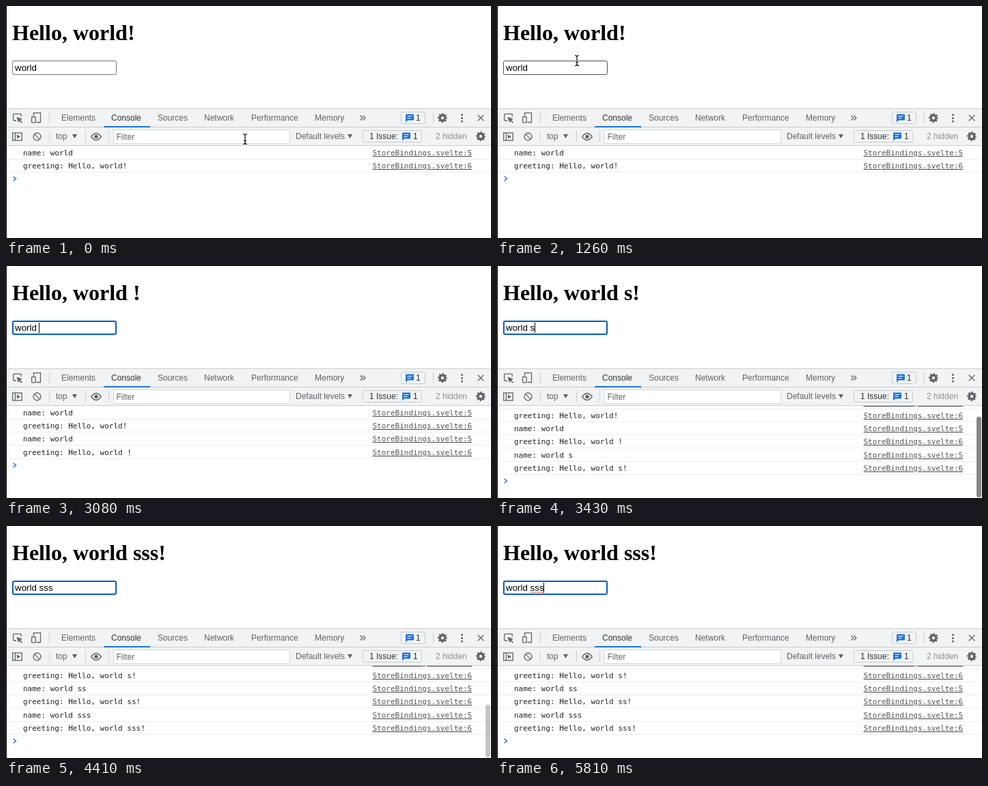
An HTML page for the animation above (5880 ms loop, 710x340 px).

```html
<!DOCTYPE html>
<html lang="en">
<head>
<meta charset="utf-8">
<title>Store bindings</title>
<style>
  html, body { margin: 0; width: 100%; height: 100%; overflow: hidden; background: #fff; }
  svg { display: block; }
  text { white-space: pre; font: 12px "Liberation Sans", Arial, sans-serif; fill: #5f6368; }
  .title { font: bold 32px "Liberation Serif", Times, serif; fill: #000; }
  .value { font-size: 13.333px; fill: #000; }
  .dark { fill: #333; }
  .log { font: 11px "DejaVu Sans Mono", monospace; fill: #242424; }
  .link { fill: #545454; text-decoration: underline; }
  .line { fill: none; stroke: #5f6368; stroke-width: 1.3; }
  .fill { fill: #5f6368; }
  .rule { fill: #cacdd1; }
  .box { fill: none; stroke: #cacdd1; }
</style>
</head>
<body>
<svg width="710" height="340" viewBox="0 0 710 340">
  <defs>
    <clipPath id="view"><rect x="1" y="205" width="709" height="135"/></clipPath>
    <g id="gear">
      <circle r="3.9" fill="none" stroke="#5f6368" stroke-width="3.2"/>
      <circle r="5.9" fill="none" stroke="#5f6368" stroke-width="2.2" stroke-dasharray="2.5 2.134" stroke-dashoffset="1.25"/>
    </g>
    <g id="chat">
      <path d="M1 0H11Q12 0 12 1V8Q12 9 11 9H3L0 12V1Q0 0 1 0Z" fill="#1a73e8"/>
      <path d="M2.5 3H9.5M2.5 6H7.5" stroke="#fff" stroke-width="1.2"/>
    </g>
    <path id="down" d="M0 0H7L3.5 6Z" class="fill"/>
  </defs>
  <rect width="710" height="340" fill="#fff"/>

  <g id="page">
    <text id="title" class="title" x="9" y="50"></text>
    <rect id="field" fill="#fff"/>
    <text id="value" class="value" x="13" y="95"></text>
    <path id="typo" d="M49.5 97.2H69" stroke="#e5433b" stroke-width="1.6" stroke-dasharray="1.8 1.4"/>
    <rect id="caret" y="83" width="1" height="15"/>
  </g>

  <g id="console" clip-path="url(#view)">
    <path id="prompt" d="M10.7-3.2L14.5 0L10.7 3.2" fill="none" stroke="#367cf1" stroke-width="1.6"/>
    <rect id="thumb" x="702" width="7" rx="3.5" fill="#858585"/>
  </g>

  <rect y="150" width="710" height="55" fill="#f1f3f4"/>
  <path class="rule" d="M0 150H710V151H0ZM0 177H710V178H0ZM0 204H710V205H0Z"/>
  <path class="rule" d="M63 156h1v16h-1zM625 156h1v16h-1zM63 183h1v16h-1zM116 183h1v16h-1zM150 183h1v16h-1z"/>

  <path class="line" d="M15 168H12Q10.7 168 10.7 166.700V159.500Q10.700 158.200 12 158.200H21Q22.300 158.200 22.300 159.500V162"/>
  <path class="fill" d="M15.500 162.500L24 165.500L20.800 167L24 170.200L22.800 171.400L19.600 168.200L18.200 171.200Z"/>
  <path class="line" d="M40.500 161V156.700H50.500V170.500H44.500"/>
  <rect class="line" x="37.600" y="162.500" width="5.500" height="8.300" rx=".8"/>
  <g id="tabs"></g>
  <rect x="143" y="176" width="68" height="2" fill="#1a73e8"/>
  <path class="line" d="M518.500 160.500l3.500 3.500l-3.500 3.500M522.500 160.500l3.500 3.500l-3.500 3.500"/>
  <rect class="box" x="578.500" y="155.500" width="35" height="17" rx="2"/>
  <use href="#chat" x="585" y="158.500"/>
  <text class="dark" x="600" y="168">1</text>
  <use href="#gear" x="639" y="164"/>
  <g class="fill"><circle cx="667.500" cy="159.500" r="1.500"/><circle cx="667.500" cy="164.200" r="1.500"/><circle cx="667.500" cy="169" r="1.500"/></g>
  <path class="line" d="M690.700 159.700l8.600 8.600m0-8.600l-8.600 8.600"/>

  <rect class="line" x="9.700" y="186" width="13.600" height="11"/>
  <path class="line" d="M13.500 186v11"/>
  <path class="fill" d="M16 188.500l5 3l-5 3z"/>
  <circle class="line" cx="45.500" cy="191.500" r="5.500"/>
  <path class="line" d="M41.600 187.600l7.800 7.800"/>
  <text x="73" y="195">top</text>
  <use href="#down" x="97" y="188"/>
  <path class="line" d="M124.700 191.500Q132 181.500 139.300 191.500Q132 201.500 124.700 191.500Z"/>
  <circle class="fill" cx="132" cy="191.500" r="2.700"/>
  <rect x="157.500" y="181.500" width="258" height="20" fill="#fff" stroke="#d5dae0"/>
  <text x="161.500" y="196">Filter</text>
  <text x="424" y="195">Default levels</text>
  <use href="#down" x="500" y="188"/>
  <rect class="box" x="522.500" y="182.500" width="86" height="17" rx="2"/>
  <text class="dark" x="532" y="195">1 Issue:</text>
  <use href="#chat" x="580" y="185.500"/>
  <text class="dark" x="596" y="195">1</text>
  <text x="629" y="195" style="fill:#8b9095">2 hidden</text>
  <use href="#gear" x="695" y="191"/>

  <rect width="1" height="340"/>
  <g id="mouse">
    <g id="beam" fill="none">
      <path id="beamShape" d="M-3-7.500Q0-7.500 0-5.500Q0-7.500 3-7.500M0-5.500V5.500M-3 7.500Q0 7.500 0 5.500Q0 7.500 3 7.500M-2 2.500H2" stroke="#fff" stroke-width="2.600"/>
      <use href="#beamShape"/>
      <path d="M-3-7.500Q0-7.500 0-5.500Q0-7.500 3-7.500M0-5.500V5.500M-3 7.500Q0 7.500 0 5.500Q0 7.500 3 7.500M-2 2.500H2" stroke="#000" stroke-width="1.200"/>
    </g>
    <path id="arrow" d="M0-.500V13.500L3.200 10.600L5.500 16L7.900 15L5.600 9.700H9.800Z" stroke="#fff" stroke-width="1" paint-order="stroke"/>
  </g>
</svg>
<script>
const LOOP = 5880, CLICK = 1820, ROW = 19.2;
const $ = id => document.getElementById(id);

// time, input text, caret x
const keys = [
  [0, 'world', 45],
  [3010, 'world ', 48],
  [3270, 'world s', 55],
  [3520, 'world ss', 62],
  [3780, 'world sss', 68]
];
// time, x, y
const path = [
  [70, 350, 195], [1190, 117, 80], [1330, 117, 80], [1680, 117, 86],
  [4900, 117, 86], [5040, 267, 89], [5600, 290, 322], [5740, 292, 352]
];
// time, offset
const bounce = [[4900, 0], [5040, -3], [5110, -4], [5400, 0]];

function add(parent, tag, attrs, content = '') {
  const el = document.createElementNS('http://www.w3.org/2000/svg', tag);
  set(el, attrs);
  el.textContent = content;
  return parent.appendChild(el);
}
function set(el, attrs) {
  for (const name in attrs) el.setAttribute(name, attrs[name]);
}
function show(el, on) {
  el.style.display = on ? '' : 'none';
}

// Smooth values from a table of [time, ...values]
function sample(table, t) {
  const i = table.findIndex(k => k[0] > t);
  if (i < 0) return table[table.length - 1].slice(1);
  if (i === 0) return table[0].slice(1);
  const a = table[i - 1], b = table[i];
  const p = (t - a[0]) / (b[0] - a[0]), e = p * p * (3 - 2 * p);
  return a.slice(1).map((v, n) => v + (b[n + 1] - v) * e);
}
const inside = (x, y, l, t, r, b) => x >= l && x <= r && y >= t && y <= b;

[['Elements', 81], ['Console', 154], ['Sources', 222], ['Network', 290],
 ['Performance', 359], ['Memory', 452]].forEach(([name, x]) =>
  add($('tabs'), 'text', { x, y: 168, class: name === 'Console' ? 'dark' : '' }, name));

const rows = keys.flatMap(([, name]) => [`name: ${name}`, `greeting: Hello, ${name}!`]).map((msg, i) => {
  const g = add($('console'), 'g', {});
  add(g, 'text', { class: 'log', x: 25, y: 4 }, msg);
  add(g, 'text', { class: 'log link', x: 536.5, y: 4 }, `StoreBindings.svelte:${5 + i % 2}`);
  add(g, 'rect', { x: 1, y: 9, width: 709, height: 1, fill: '#eee' });
  return g;
});
$('console').append($('thumb'));

function drawPage(t, step, x, y) {
  const [time, name, caretX] = keys[step];
  const focus = t >= CLICK;
  $('title').textContent = `Hello, ${name}!`;
  $('value').textContent = name;
  const hover = inside(x, y, 9, 80, 162, 101);
  set($('field'), focus
    ? { x: 10, y: 81, width: 151, height: 19, rx: 2, stroke: '#0b5cc0', 'stroke-width': 2 }
    : { x: 9.5, y: 80.5, width: 152, height: 20, rx: 2, stroke: hover ? '#4f4f4f' : '#767676', 'stroke-width': 1 });
  set($('caret'), { x: caretX });
  show($('caret'), focus && (t - Math.max(time, CLICK)) % 1000 < 500);
  show($('typo'), t >= 4830);
  set($('page'), { transform: `translate(0 ${Math.round(sample(bounce, t)[0])})` });
}

function drawConsole(t, step) {
  const count = 2 * (step + 1);
  const scroll = Math.max(0, count * ROW - 100);
  const place = (el, i) => set(el, { transform: `translate(0 ${Math.round(215 + i * ROW - scroll)})` });
  rows.forEach((row, i) => {
    show(row, i < count);
    place(row, i);
  });
  place($('prompt'), count);
  const height = 135 * 135 / (135 + scroll) - 3;
  set($('thumb'), {
    y: 339 - height, height,
    opacity: scroll ? Math.min(1, Math.max(0, (4480 - t) / 140)) : 0
  });
}

function drawMouse(t, x, y) {
  const text = inside(x, y, 9, 80, 162, 101) || inside(x, y, 157, 181, 416, 202);
  set($('mouse'), { transform: `translate(${x} ${y})` });
  show($('mouse'), t < 3010 || t >= 4970);
  show($('beam'), text);
  show($('arrow'), !text);
}

function draw(t) {
  const step = keys.filter(k => k[0] <= t).length - 1;
  const [x, y] = sample(path, t);
  drawPage(t, step, x, y);
  drawConsole(t, step);
  drawMouse(t, x, y);
}

const start = performance.now();
function tick() {
  draw((performance.now() - start) % LOOP);
  requestAnimationFrame(tick);
}
tick();
</script>
</body>
</html>
```
